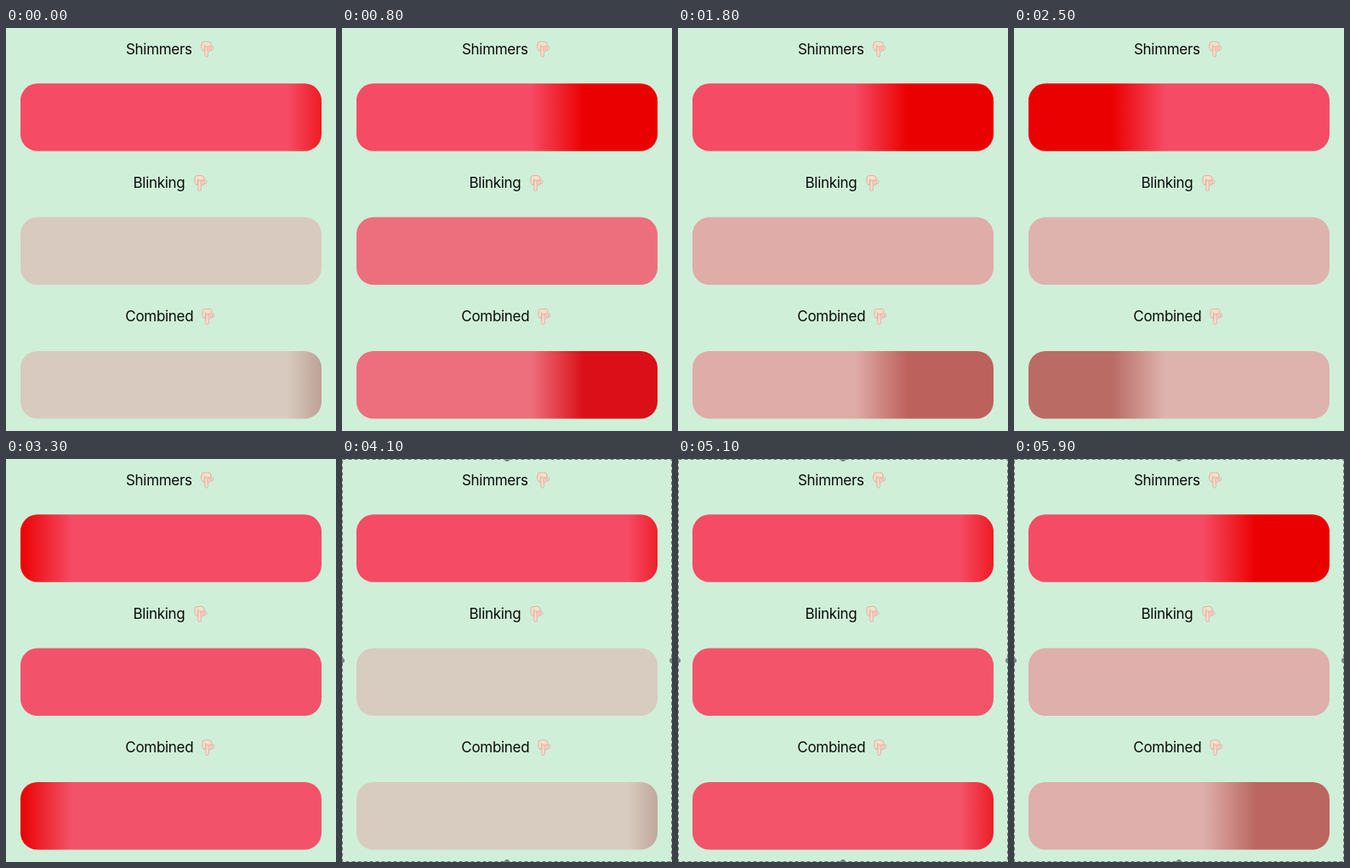
An HTML page with a canvas that plays this animation: 388 by 474 pixels, repeating every 6 s.

```html
<!DOCTYPE html>
<html lang="en">
<head>
<meta charset="utf-8">
<style>
  html, body { margin: 0; width: 100%; height: 100%; overflow: hidden; background: #d0efd8; }
  canvas { display: block; }
</style>
</head>
<body>
<canvas id="stage" width="388" height="474"></canvas>
<script>
const ctx = document.getElementById('stage').getContext('2d');
const LOOP = 6000, STEP = 100;
const CYCLE = 1020, START = 130;       // one sweep, or half a blink
const BORDER_FROM = 3800;
const BACK = [208, 239, 216], PINK = [245, 75, 100], RED = [235, 0, 0];
const BAR = { x: 17, w: 354, h: 79.5, r: 20 };
const BAND = { from: -162, travel: 510, width: 228, ramp: 62 };

const mix = (a, b, k) => a.map((v, i) => v + (b[i] - v) * k);
const rgb = c => `rgb(${c.map(v => Math.round(Math.max(0, v)))})`;

// cubic-bezier(.42, 0, .58, 1)
function easeInOut(u) {
  let lo = 0, hi = 1, s = 0.5;
  for (let i = 0; i < 20; i++) {
    const q = 1 - s;
    const x = 1.26 * q * q * s + 1.74 * q * s * s + s * s * s;
    if (x < u) lo = s; else hi = s;
    s = (lo + hi) / 2;
  }
  return s * s * (3 - 2 * s);
}

function bandFill(sweep, base, glow) {
  const x = BAND.from + BAND.travel * sweep;
  const fill = ctx.createLinearGradient(x, 0, x + BAND.width, 0);
  const edge = BAND.ramp / BAND.width;
  fill.addColorStop(0, rgb(base));
  fill.addColorStop(edge, rgb(glow));
  fill.addColorStop(1 - edge, rgb(glow));
  fill.addColorStop(1, rgb(base));
  return fill;
}

function bar(y, fill) {
  ctx.fillStyle = fill;
  ctx.beginPath();
  ctx.roundRect(BAR.x, y, BAR.w, BAR.h, BAR.r);
  ctx.fill();
}

function hand(x, y) {
  ctx.save();
  ctx.translate(x, y);
  ctx.fillStyle = '#f9dccb';
  ctx.strokeStyle = '#d3a592';
  ctx.lineWidth = 0.7;
  const part = (px, py, w, h, r) => {
    ctx.beginPath();
    ctx.roundRect(px, py, w, h, r);
    ctx.fill();
    ctx.stroke();
  };
  part(-6, -8.5, 11, 9, 3);
  part(-2.2, -3, 3.6, 12.5, 1.8);
  for (let i = 0; i < 3; i++) part(1 + i * 2.1, -3, 2.5, 6 - i, 1.2);
  ctx.beginPath();
  ctx.moveTo(-6, -5);
  ctx.quadraticCurveTo(-7.5, -1, -4.5, 2.5);
  ctx.quadraticCurveTo(-2.5, 3, -2.5, 0);
  ctx.lineTo(-2.5, -5);
  ctx.fill();
  ctx.stroke();
  ctx.restore();
}

function label(text, x, baseline, handX) {
  ctx.fillStyle = '#080d0a';
  ctx.font = '17px Inter, sans-serif';
  ctx.letterSpacing = '-0.3px';
  ctx.fillText(text, x, baseline);
  hand(handX, baseline - 6);
}

function border() {
  ctx.strokeStyle = '#6d7871';
  ctx.lineWidth = 1;
  ctx.setLineDash([4, 3]);
  ctx.strokeRect(0.5, 0.5, 387, 473);
  ctx.setLineDash([]);
  ctx.fillStyle = '#7b817d';
  for (const [x, y] of [[194, 0], [388, 237], [194, 474], [0, 237]]) {
    ctx.beginPath();
    ctx.arc(x, y, 3, 0, 2 * Math.PI);
    ctx.fill();
  }
}

function draw(t) {
  const cycles = (t - START) / CYCLE + 2;
  const half = Math.floor(cycles);
  const sweep = easeInOut(cycles - half);
  const alpha = 0.2 + 0.77 * (half % 2 ? 1 - sweep : sweep);
  const faded = mix(BACK, PINK, alpha);
  const fadedGlow = [157 + 78 * alpha, 188 - 221 * alpha, 168 - 186 * alpha];

  ctx.fillStyle = rgb(BACK);
  ctx.fillRect(0, 0, 388, 474);
  label('Shimmers', 141, 30.5, 236);
  bar(65.3, bandFill(sweep, PINK, RED));
  label('Blinking', 149.5, 188, 228);
  bar(222.6, rgb(faded));
  label('Combined', 140.3, 345, 237);
  bar(380, bandFill(sweep, faded, fadedGlow));
  if (t >= BORDER_FROM) border();
}

function tick() {
  const t = performance.now() % LOOP;
  draw(Math.floor(t / STEP) * STEP);
  requestAnimationFrame(tick);
}
tick();
</script>
</body>
</html>
```
